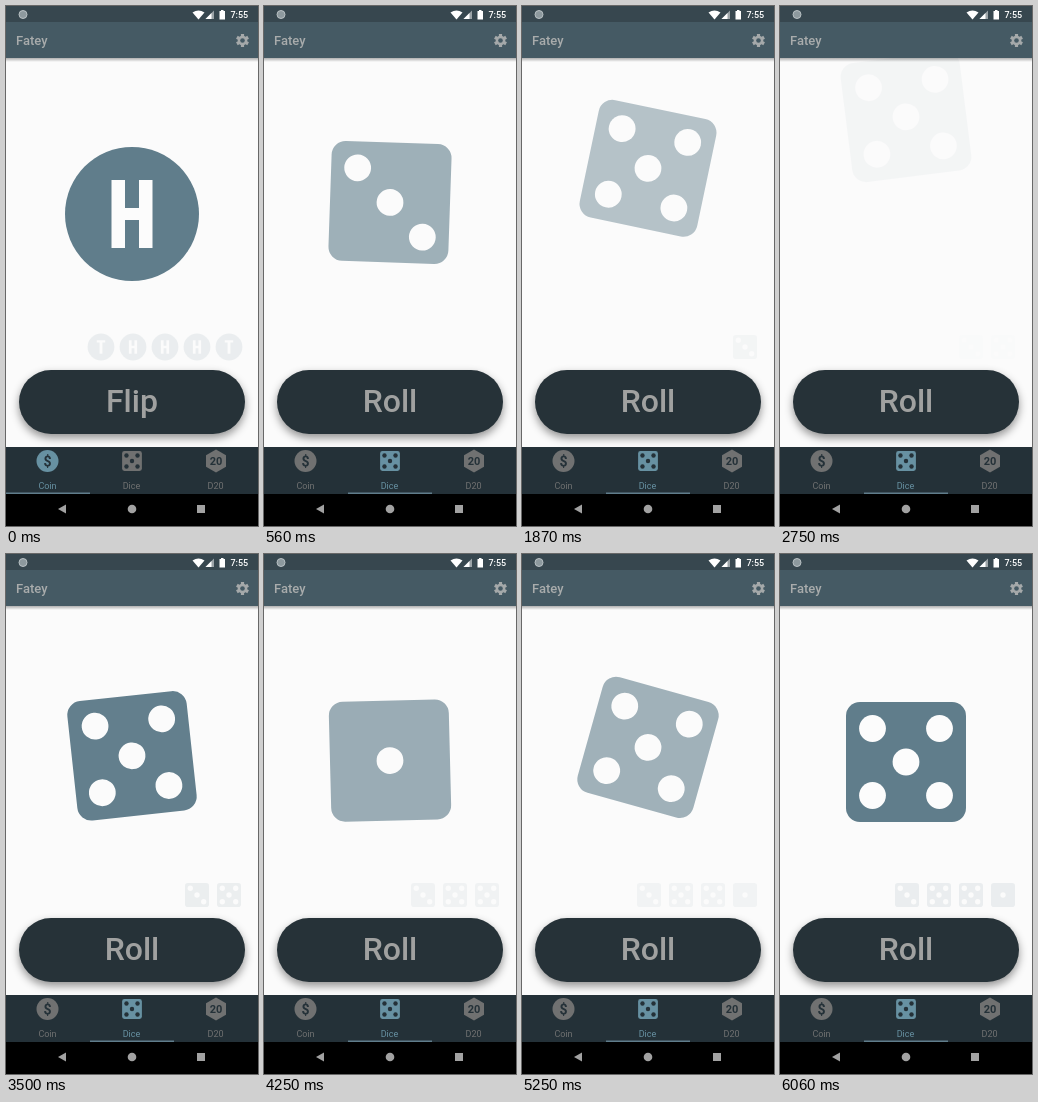
An HTML page that plays this animation: 252 by 520 pixels, repeating every 6120 ms.

```html
<!DOCTYPE html>
<html lang="en">
<head>
<meta charset="utf-8">
<title>Fatey</title>
<style>
  html, body { margin: 0; width: 100%; height: 100%; overflow: hidden; background: #fafafa; }
  svg { display: block; width: 252px; height: 520px; font-family: Roboto, sans-serif; }
  .button { fill: #263238; filter: drop-shadow(0 4px 4px rgba(0, 0, 0, .42)); }
  .action { font-size: 32px; font-weight: 500; fill: #a0a1a0; text-anchor: middle; }
  .tab { text-anchor: middle; font-size: 9px; }
  .tab .mark { font-weight: 700; fill: #243138; }
</style>
</head>
<body>
<svg viewBox="0 0 252 520">
  <defs>
    <g id="H">
      <circle r="67" fill="#607d8b"/>
      <path d="M-20.5-34h13.5v28h14v-28h13.5v68h-13.5v-28h-14v28h-13.5z" fill="#fcfcfc"/>
    </g>
    <g id="T">
      <circle r="67" fill="#607d8b"/>
      <path d="M-21-34h42v12h-14v56h-14v-56h-14z" fill="#fcfcfc"/>
    </g>
    <linearGradient id="shade" x2="0" y2="1">
      <stop stop-opacity=".3"/><stop offset="1" stop-opacity="0"/>
    </linearGradient>
  </defs>

  <rect width="252" height="520" fill="#fbfbfb"/>

  <g id="coinPage">
    <use href="#H" x="126" y="208"/>
    <g id="coinHistory" opacity=".1"></g>
    <rect class="button" x="13" y="364" width="226" height="64" rx="32"/>
    <text class="action" x="126" y="406">Flip</text>
  </g>

  <g id="dicePage">
    <g id="die"></g>
    <g id="diceHistory"></g>
    <rect class="button" x="13" y="364" width="226" height="64" rx="32"/>
    <text class="action" x="126" y="406">Roll</text>
  </g>

  <!-- status and title bars -->
  <rect y="52" width="252" height="4" fill="url(#shade)"/>
  <rect width="252" height="52" fill="#455a64"/>
  <rect width="252" height="16" fill="#37474f"/>
  <circle cx="17" cy="8.5" r="4" fill="#8d999e" stroke="#b9c1c4"/>
  <g fill="#fff">
    <path d="M186.500 6.500q6-4 12 0l-6 7z"/>
    <path d="M208 4.500v8.500h-8.500z" opacity=".5"/>
    <path d="M205.500 7v6h-6z"/>
    <path d="M213.500 5h1.500v-1h2.500v1h1.500v8.500h-5.500z"/>
    <text x="224.500" y="12" font-size="9" font-weight="500">7:55</text>
  </g>
  <text x="10" y="39" font-size="13" font-weight="500" fill="#a9acac">Fatey</text>
  <g id="gear" transform="translate(236.500 34.500)" fill="#a5a9aa">
    <circle r="4.800"/>
  </g>

  <!-- tabs and system navigation -->
  <rect y="441" width="252" height="47" fill="#243138"/>
  <g class="tab">
    <circle cx="41.500" cy="455" r="11"/>
    <text class="mark" x="41.500" y="460" font-size="14">$</text>
    <text x="41.500" y="483">Coin</text>
  </g>
  <g class="tab">
    <g id="tabDie"></g>
    <text x="125.500" y="483">Dice</text>
  </g>
  <g class="tab">
    <path d="M210 443.500l10 5.700v11.600l-10 5.700l-10-5.700v-11.600z"/>
    <text class="mark" x="210" y="459" font-size="11">20</text>
    <text x="209.500" y="483">D20</text>
  </g>
  <rect id="indicator" y="486.500" width="84" height="1.500" fill="#607d8b"/>
  <rect y="488" width="252" height="32" fill="#000"/>
  <g fill="#a2a2a2">
    <path d="M52 503l8-4.500v9z"/>
    <circle cx="126" cy="503" r="4.300"/>
    <rect x="191" y="499" width="8" height="8"/>
  </g>
</svg>

<script>
const LOOP = 6120, ROLL = 1000, SWITCH = 180, SLIDE = 300, DROP = 100;
const rolls = [
  { start: 219, face: 3, spin: 17 },
  { start: 1603, face: 5, spin: 26 },
  { start: 2690, face: 5, spin: -100 },
  { start: 3890, face: 1, spin: -100 },
  { start: 4915, face: 5, spin: 107 }
];
const $ = id => document.getElementById(id);
const tabs = document.querySelectorAll('.tab');
const clamp = v => Math.min(1, Math.max(0, v));
const place = (id, transform) => $(id).setAttribute('transform', transform);

// cubic-bezier(.25, .1, .25, 1)
function ease(x) {
  const curve = (a, b, u) => 3 * a * u * (1 - u) ** 2 + 3 * b * u * u * (1 - u) + u ** 3;
  let lo = 0, hi = 1;
  for (let i = 0; i < 20; i++) {
    const mid = (lo + hi) / 2;
    if (curve(.25, .25, mid) < x) lo = mid; else hi = mid;
  }
  return curve(.1, 1, lo);
}

function bounceOut(t) {
  const k = 7.5625, n = 2.75;
  if (t < 1 / n) return k * t * t;
  if (t < 2 / n) return k * (t - 1.5 / n) ** 2 + .75;
  if (t < 2.5 / n) return k * (t - 2.25 / n) ** 2 + .9375;
  return k * (t - 2.625 / n) ** 2 + .984375;
}

function dieFace(n, fill = '#607d8b', hole = '#fcfcfc') {
  const d = 33.5, pips = [];
  if (n % 2) pips.push([0, 0]);
  if (n > 1) pips.push([-d, -d], [d, d]);
  if (n > 3) pips.push([d, -d], [-d, d]);
  return `<rect x="-60" y="-60" width="120" height="120" rx="14" fill="${fill}"/>` +
    pips.map(([x, y]) => `<circle cx="${x}" cy="${y}" r="13.4" fill="${hole}"/>`).join('');
}

// newest result sits at the right
const row = items => items.map((item, i) =>
  `<g transform="translate(${223 - 32 * (items.length - 1 - i)} 341) scale(.2)">${item}</g>`).join('');

$('coinHistory').innerHTML = row([...'THHHT'].map(side => `<use href="#${side}"/>`));
$('tabDie').innerHTML = dieFace(5, 'inherit', '#243138');
place('tabDie', 'translate(126 455) scale(.165)');
$('gear').innerHTML += [0, 60, 120].map(a =>
  `<rect x="-1.6" y="-6.5" width="3.2" height="13" transform="rotate(${a})"/>`).join('') +
  '<circle r="2.3" fill="#455a64"/>';

let shown = -1;
function draw(now) {
  const time = now % LOOP;
  const slide = ease(clamp((time - SWITCH) / SLIDE));
  place('coinPage', `translate(${-252 * slide} 0)`);
  place('dicePage', `translate(${252 * (1 - slide)} 0)`);
  $('indicator').setAttribute('x', 84 * slide);
  [1 - slide, slide, 0].forEach((on, i) => {
    const mix = (a, b) => Math.round(a + (b - a) * on);
    tabs[i].setAttribute('fill', `rgb(${mix(112, 103)},${mix(113, 145)},${mix(113, 162)})`);
  });

  const index = Math.max(0, rolls.filter(r => r.start <= time).length - 1);
  const { start, face, spin } = rolls[index];
  if (index !== shown) {
    shown = index;
    $('die').innerHTML = dieFace(face);
    $('diceHistory').innerHTML = row(rolls.slice(0, index).map(r => dieFace(r.face)));
  }
  const t = clamp((time - start) / ROLL);
  const left = 1 - bounceOut(t), fade = ease(t);
  place('die', `translate(126 ${208 - DROP * left}) rotate(${spin * left})`);
  $('die').setAttribute('opacity', fade);
  $('diceHistory').setAttribute('opacity', .1 * fade);
}

function tick() {
  draw(performance.now());
  requestAnimationFrame(tick);
}
tick();
</script>
</body>
</html>
```
